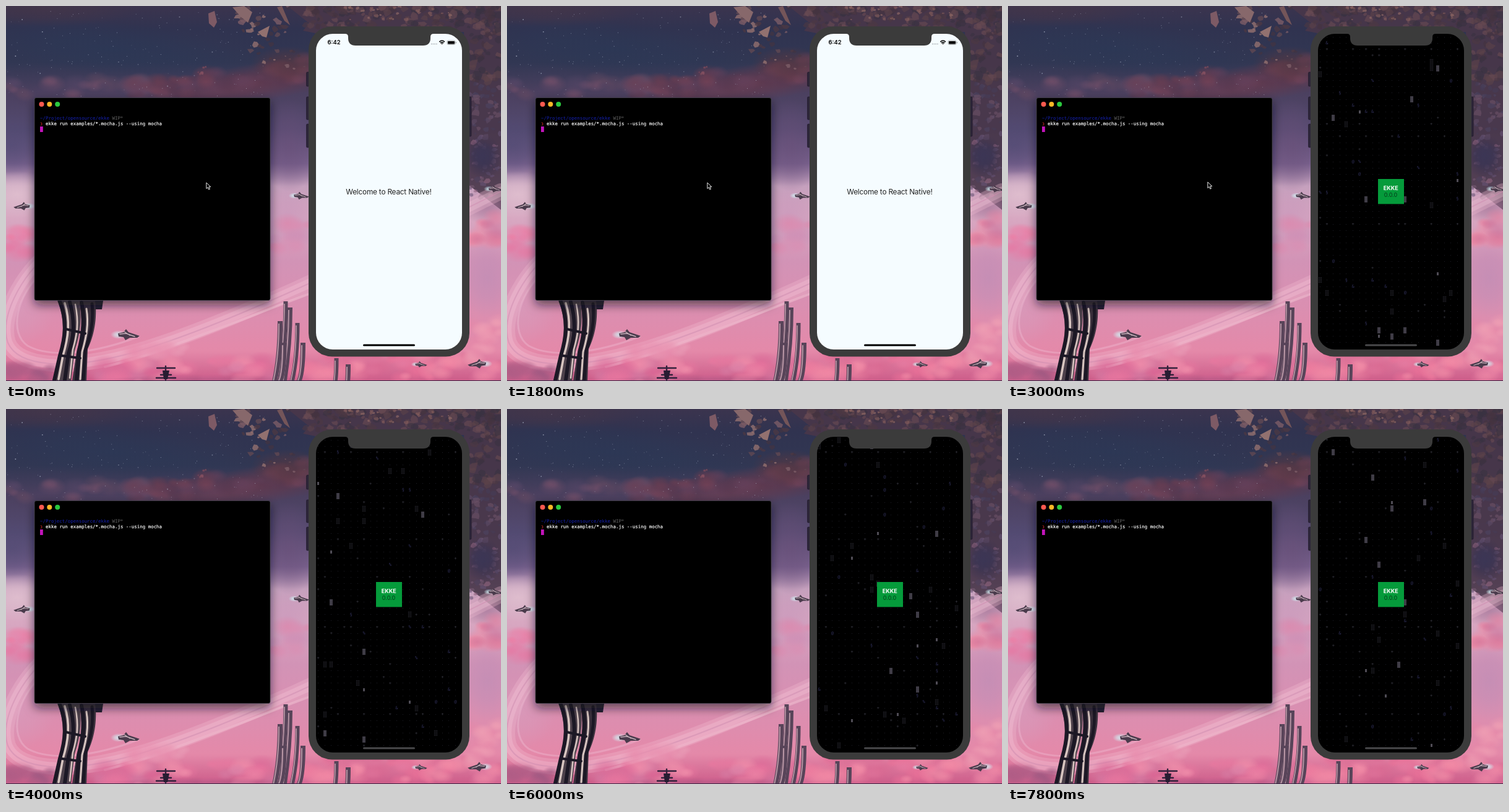
Write an HTML page with a canvas that moves like this. It is 800x607 px and loops after 8000 ms.

```html
<!DOCTYPE html>
<html lang="en">
<head>
<meta charset="utf-8">
<title>Terminal and phone</title>
<style>
  html, body { margin: 0; width: 100%; height: 100%; overflow: hidden; background: #54405f; }
  canvas, svg { position: absolute; left: 0; top: 0; width: 800px; height: 607px; }
  .mono { font: 7.45px "DejaVu Sans Mono", monospace; white-space: pre; }
  .ui { font-family: Inter, sans-serif; }
</style>
</head>
<body>
<canvas id="scenery" width="800" height="607"></canvas>

<svg viewBox="0 0 800 607">
  <defs>
    <filter id="shadow" x="-20%" y="-20%" width="140%" height="150%">
      <feDropShadow dx="0" dy="7" stdDeviation="8" flood-color="#180a22" flood-opacity=".6"/>
    </filter>
  </defs>

  <g id="terminal">
    <rect x="46" y="148.5" width="381" height="328" rx="3" fill="#000" stroke="#46434f" stroke-width=".8" filter="url(#shadow)"/>
    <circle cx="57.5" cy="159" r="4" fill="#ff5a50"/>
    <circle cx="70.3" cy="159" r="4" fill="#fdb827"/>
    <circle cx="83.2" cy="159" r="4" fill="#2bc93f"/>
    <g class="mono">
      <text x="55" y="184" fill="#1420ae">~/Project/opensource/ekke <tspan fill="#646464">WIP*</tspan></text>
      <text x="55" y="193" fill="#b3261e">❯</text>
      <text x="64" y="193" fill="#fff" stroke="#fff" stroke-width=".15">ekke run examples/*.mocha.js --using mocha</text>
    </g>
    <rect x="55" y="195" width="4.8" height="9" fill="#c314bb"/>
  </g>

  <g id="phone">
    <g fill="#2c2538" stroke="#1c1726" stroke-width=".6">
      <rect x="485.5" y="107" width="6" height="23" rx="1.5"/>
      <rect x="485.5" y="147" width="6" height="37" rx="1.5"/>
      <rect x="485.5" y="191" width="6" height="38" rx="1.5"/>
      <rect x="746" y="147" width="6" height="64" rx="1.5"/>
    </g>
    <rect x="489" y="33" width="260" height="534.5" rx="38" fill="#3b3b3b"/>
    <rect id="screen" x="501" y="45" width="236" height="511" rx="27" fill="#f5fcff"/>
  </g>
</svg>

<canvas id="glyphs" width="800" height="607"></canvas>

<svg viewBox="0 0 800 607">
  <path fill="#3b3b3b" d="M548 44H691V45Q686 45 686 50V52Q686 64 674 64H565Q553 64 553 52V50Q553 45 548 45Z"/>
  <rect id="home" x="577" y="547.4" width="84" height="3.2" rx="1.6"/>

  <g id="welcome" class="ui">
    <text x="618.5" y="304.6" font-size="11.8" letter-spacing="-.2" text-anchor="middle" fill="#222">Welcome to React Native!</text>
    <text x="519.5" y="62.3" font-size="9.4" font-weight="600">6:42</text>
    <path d="M687 61.5H697" stroke="#aab0b3" stroke-width="1.6" stroke-dasharray="1.6 1.1"/>
    <g fill="none" stroke="#000" stroke-width="1.5">
      <path d="M700.3 58.1Q704.6 54 708.9 58.1M702 60Q704.6 57.6 707.2 60"/>
      <path d="M703.5 60.8L704.6 62L705.7 60.8Z" stroke-width=".6" fill="#000"/>
    </g>
    <rect x="713" y="56" width="13" height="6.4" rx="1.8" fill="none" stroke="#888" stroke-width=".7"/>
    <rect x="714" y="57" width="11" height="4.4" rx="1"/>
    <rect x="726.6" y="58" width="1" height="2.4" fill="#888"/>
  </g>

  <g id="badge" class="ui" font-size="9" text-anchor="middle">
    <rect x="598" y="280" width="42" height="40.5" fill="#059b3b"/>
    <text x="618.8" y="298" font-weight="700" fill="#fff">EKKE</text>
    <text x="618.5" y="308.8" fill="#06391a">0.0.0</text>
  </g>

  <path id="pointer" d="M0 0V9.6L2.3 7.5L3.9 11.1L5.6 10.4L4 6.8H7Z" fill="#000" stroke="#fff" stroke-width=".9" stroke-linejoin="round"/>
</svg>

<script>
const $ = id => document.getElementById(id);
const LOOP = 8000, STEP = 200, NUDGE = 2600, LAUNCH = 3000, POINTER_HIDE = 3800;

function random(seed) {
  return () => {
    seed = seed + 0x6D2B79F5 | 0;
    let v = Math.imul(seed ^ seed >>> 15, seed | 1);
    v ^= v + Math.imul(v ^ v >>> 7, v | 61);
    return ((v ^ v >>> 14) >>> 0) / 4294967296;
  };
}

function paintScenery() {
  const c = $('scenery').getContext('2d');
  const rnd = random(42);
  const between = (a, b) => a + (b - a) * rnd();
  const pick = list => list[Math.floor(rnd() * list.length)];

  const shape = (d, fill) => { c.fillStyle = fill; c.fill(new Path2D(d)); };
  const line = (d, color, width) => {
    c.strokeStyle = color; c.lineWidth = width; c.stroke(new Path2D(d));
  };
  function glow(x, y, rx, ry, color, alpha = 1, tilt = 0) {
    c.save();
    c.translate(x, y); c.rotate(tilt); c.scale(rx, ry);
    const g = c.createRadialGradient(0, 0, 0, 0, 0, 1);
    g.addColorStop(0, color); g.addColorStop(.5, color + 'a0'); g.addColorStop(1, color + '00');
    c.globalAlpha = alpha; c.fillStyle = g;
    c.fillRect(-1, -1, 2, 2);
    c.restore();
  }
  function cloud(x, y, w, h, count, colors, rise = 0) {
    for (let i = 0; i < count; i++) {
      const r = between(6, 19), u = rnd();
      glow(x + u * w, y + between(0, h) - u * rise, r * 1.5, r, pick(colors), .6);
    }
  }
  function rocks(x, y, w, h, count, size, colors) {
    for (let i = 0; i < count; i++) {
      const px = x + between(0, w), py = y + between(0, h), r = between(size * .3, size);
      c.beginPath();
      for (let k = 0; k < 7; k++) {
        const a = k / 7 * Math.PI * 2, d = r * between(.45, 1.1);
        c.lineTo(px + Math.cos(a) * d, py + Math.sin(a) * d * .8);
      }
      c.fillStyle = pick(colors);
      c.fill();
    }
  }

  // Sky
  const sky = c.createLinearGradient(0, 0, 0, 607);
  [[0, '#3b344e'], [.06, '#303350'], [.15, '#313753'], [.23, '#4b405f'], [.33, '#534a70'],
   [.42, '#7b6390'], [.48, '#c5a0bd'], [.56, '#d8a9c2'], [.68, '#d293b6'], [.8, '#da8fb1'],
   [.92, '#e489a9'], [1, '#cc5c89']].forEach(s => sky.addColorStop(...s));
  c.fillStyle = sky;
  c.fillRect(0, 0, 800, 607);

  glow(170, 70, 220, 45, '#2b3856', .7, .1);
  glow(60, 5, 160, 28, '#453648', .7);
  cloud(0, 120, 240, 28, 30, ['#4d4060', '#634961', '#76506a', '#564666']);
  glow(400, 125, 220, 32, '#68394c', .8, -.18);
  cloud(190, 125, 300, 32, 55, ['#6d3d50', '#7d465a', '#573850', '#64405a'], 40);
  glow(455, 95, 60, 30, '#553742', .8);
  glow(458, 225, 50, 75, '#6a5079', .7);
  glow(10, 225, 55, 50, '#514a73', .7);
  glow(18, 305, 60, 38, '#e3c3d1', .8);
  glow(455, 345, 55, 55, '#c795ba', .7);
  cloud(-10, 365, 52, 38, 12, ['#ee7ba3', '#e874a0', '#dd93b7']);
  cloud(425, 340, 65, 65, 14, ['#d98fb3', '#df86ab', '#cc91b7']);
  glow(20, 490, 60, 60, '#d79dbd', .6);

  for (let i = 0; i < 170; i++) {
    c.globalAlpha = between(.2, .8);
    c.fillStyle = '#b9c1d4';
    const s = rnd() < .08 ? 1.6 : .9;
    c.fillRect(between(0, 420), between(8, 146), s, s);
  }
  c.globalAlpha = 1;

  // Broken planet and its debris
  const stone = ['#604852', '#7c5c66', '#4b3843', '#94706f', '#413544'];
  const dark = ['#44343f', '#4d3942', '#5c434a', '#393241', '#694b53'];
  c.globalAlpha = .9;
  shape('M455 0L490 28L480 40L520 48L740 42L748 290L800 330V0Z', '#49374a');
  c.globalAlpha = .6;
  rocks(480, 0, 320, 36, 150, 11, dark);
  rocks(748, 0, 52, 125, 60, 12, dark);
  rocks(540, 0, 180, 22, 30, 5, ['#9a6f69', '#8a605d']);
  rocks(748, 125, 52, 90, 45, 8, ['#4c4462', '#5d4b66', '#6d5268', '#463c57']);
  rocks(748, 205, 52, 105, 50, 7, ['#765a73', '#50425f', '#936680', '#665374']);
  c.globalAlpha = .8;
  rocks(365, 0, 105, 45, 22, 9, stone);
  rocks(395, 45, 70, 32, 14, 7, stone);
  rocks(410, 80, 75, 22, 9, 5, stone);
  rocks(310, 98, 14, 14, 5, 6, ['#8a5262', '#7a4a5a']);
  c.globalAlpha = 1;
  shape('M327 12L337 8L341 26L336 35L328 28Z', '#7d5a65');
  shape('M366 2L385 0L398 10L391 27L379 17Z', '#87686b');
  shape('M407 42L426 32L421 51L414 49Z', '#92716f');
  shape('M438 2L446 0L459 31L450 24Z', '#745559');
  glow(772, 245, 30, 36, '#3a3350', 1);
  glow(770, 242, 22, 24, '#3c3655', 1);
  glow(776, 325, 42, 28, '#a9789b', .8);
  cloud(752, 340, 48, 42, 18, ['#e57f9f', '#ec8ca6', '#cf7299']);
  glow(778, 440, 45, 65, '#c28db5', .8);

  // Planetary ring
  c.lineCap = 'round';
  const ring = 'M800 300C590 405 330 530 190 565C100 588 20 585 3 545C-10 505 20 440 75 395';
  line(ring, '#f0bdd14d', 26);
  line(ring, '#f4cbda4d', 15);
  line(ring, '#cd8cb080', 2);
  line('M500 462C360 515 250 562 160 584', '#f3c5d680', 4);
  line('M60 430C15 470 5 530 35 550C75 572 150 560 215 535', '#edbcd366', 3);

  // Low clouds
  cloud(150, 572, 330, 38, 55, ['#e9779f', '#dc6796', '#f495ae', '#d67da5']);
  cloud(200, 548, 90, 15, 10, ['#eaa0b9', '#e88eae']);
  cloud(475, 563, 325, 40, 65, ['#ec7299', '#f58fa8', '#d9668f', '#e37ca2']);
  cloud(748, 510, 52, 65, 18, ['#f0a0b4', '#e688a8']);
  cloud(-10, 585, 100, 25, 18, ['#9a5780', '#bc5f88']);
  glow(320, 612, 190, 16, '#99507c', .6);

  // Left tower: two curved legs of dark plates and pale edges
  const cream = '#d8c6c1';
  shape('M128 477H157L155 491H132Z', '#262131');
  shape('M83 477H118C124 505 119 535 111 558L105 607H75L87 560C95 530 93 500 83 477Z', '#4d414b');
  shape('M118 477H144C148 505 142 535 132 555L130 607H107L114 560C122 530 124 505 118 477Z', '#3b313d');
  line('M87 478C99 510 96 536 87 566L78 606', '#1c1825', 6);
  line('M95 481C104 510 101 536 92 566L85 604', cream, 3.5);
  line('M103 479C112 512 110 535 101 562L95 606', '#1c1825', 6);
  line('M112 483C118 512 115 532 108 556L103 602', cream, 2.5);
  line('M122 480C128 510 125 532 118 558L114 606', '#1c1825', 6);
  line('M130 490C134 515 130 535 123 560L120 604', cream, 3);
  line('M139 482C142 512 136 535 128 558L125 606', '#1c1825', 5);
  line('M97 523L128 530M90 566L120 570', '#1c1825', 4);

  // Right spires: curved blades with blunt tops
  function spire(x, top, width) {
    const d = `M${x} ${top}Q${x} ${top + 60} ${x - 10} 612`;
    c.lineCap = 'butt';
    line(d, '#584459', width);
    line(`M${x - 2} ${top + 4}Q${x - 2} ${top + 60} ${x - 12} 612`, '#b694a3', width * .25);
    c.lineCap = 'round';
  }
  [[443, 510, 8], [452, 478, 7], [459, 488, 8], [449, 545, 9], [471, 513, 7], [480, 545, 8],
   [534, 570, 7], [553, 580, 8]].forEach(s => spire(...s));

  // Ships
  function ship(x, y, s, flip = 1) {
    c.save();
    c.translate(x, y); c.scale(s * flip, s);
    glow(-13, 0, 13, 7, '#d1edf2', .9);
    shape('M-14 -2L-5 -4L-1 -9L3 -4L21 2L17 5L5 5L-2 9L-5 4L-13 3Z', '#4a3b4c');
    line('M-11 -1L-1 -2L13 3M-4 -5L5 1', '#c7b1ba', 1.4);
    c.restore();
  }
  ship(195, 532, 1);
  ship(28, 324, .75, -1);
  ship(475, 307, .7);
  ship(789, 296, .65);
  ship(669, 580, .55);
  ship(764, 579, .85, -1);
  line('M258 583V605M244 586H273M250 597H267M243 602H274', '#32213b', 2.4);
  shape('M253 590H264L261 604H255Z', '#281c32');
  shape('M0 606H800V607H0Z', '#3c2746');
}

const ink = $('glyphs').getContext('2d');

function paintGlyphs(step) {
  const rnd = random(step * 977 + 5);
  ink.clearRect(0, 0, 800, 607);
  ink.save();
  ink.beginPath();
  ink.roundRect(501, 45, 236, 511, 27);
  ink.clip();
  ink.font = '7px "DejaVu Sans Mono", monospace';
  ink.textAlign = 'center';
  ink.textBaseline = 'middle';
  const box = (x, y, w, h, color) => {
    ink.fillStyle = color;
    ink.fillRect(Math.round(x - w / 2), Math.round(y - h / 2), w, h);
  };
  const put = (char, x, y, color) => {
    ink.fillStyle = color;
    ink.fillText(char, x, y);
  };

  for (let row = 0; row < 50; row++) {
    for (let col = 0; col < 22; col++) {
      const x = 504.7 + col * 10.56, y = 50 + row * 10.1, r = rnd();
      const crossing = row % 14 === 2 && (col + row) % 4 === 3;
      if (r < .01) box(x, y, 5, 10, '#3f3c46');
      else if (r < .015) box(x, y, 3, 5, '#4f4c55');
      else if (r < .025) {
        for (let k = 0; k < 15; k++) box(x - 2 + k % 3 * 2, y - 4 + Math.floor(k / 3) * 2, 1, 1, '#3c3b48');
      } else if (r < .042) put('@%§&'[Math.floor(rnd() * 4)], x, y, '#30305a');
      else if (r < .07 || crossing) put('+', x, y, '#3d3d48');
      else box(x, y, 1, 1, '#1e1e27');
    }
  }
  ink.restore();
}

const show = (id, visible) => { $(id).style.display = visible ? '' : 'none'; };

let shown = -1;
function render() {
  const time = performance.now() % LOOP;
  const step = Math.floor(time / STEP);
  if (step !== shown) {
    shown = step;
    const running = time >= LAUNCH;
    $('screen').setAttribute('fill', running ? '#000' : '#f5fcff');
    $('home').setAttribute('fill', running ? '#49494b' : '#000');
    show('welcome', !running);
    show('badge', running);
    show('pointer', time < POINTER_HIDE);
    $('pointer').setAttribute('transform', time < NUDGE ? 'translate(323.8 286)' : 'translate(322.8 285)');
    if (running) paintGlyphs(step);
    else ink.clearRect(0, 0, 800, 607);
  }
  requestAnimationFrame(render);
}

paintScenery();
render();
</script>
</body>
</html>
```
